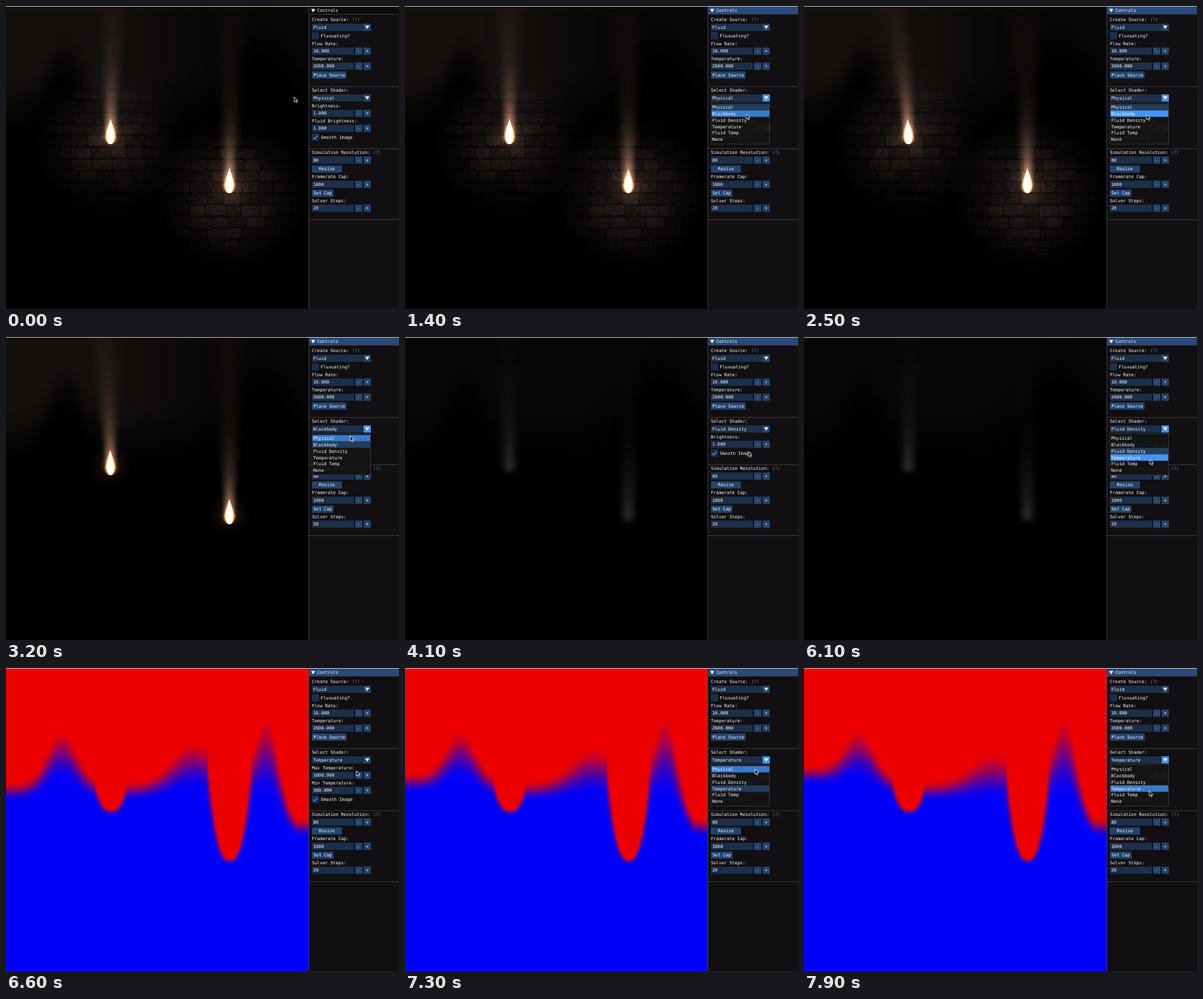
These frames come from a looping animation (600 by 463 pixels, 8 s). An HTML page with a canvas:

```html
<!DOCTYPE html>
<html lang="en">
<head>
<meta charset="utf-8">
<title>Fluid controls</title>
<style>
html, body { margin: 0; width: 600px; height: 463px; overflow: hidden; background: #000; }
canvas, svg { position: absolute; left: 0; top: 0; display: block; }
text { font: 6.73px "DejaVu Sans Mono", "Liberation Mono", monospace; white-space: pre; }
</style>
</head>
<body>
<canvas id="view" width="600" height="463"></canvas>
<svg id="ui" width="600" height="463" viewBox="0 0 600 463"></svg>
<script>
const LOOP = 8000, STEP = 100, W = 462, H = 463;
const ctx = document.getElementById('view').getContext('2d');
const ui = document.getElementById('ui');

// Each menu opens, then its click switches the mode; the last stays open.
const items = ['Physical', 'Blackbody', 'Fluid Density', 'Temperature', 'Fluid Temp', 'None'];
const menus = [
  { open: 800, pick: 2600 }, { open: 3000, pick: 3700 },
  { open: 5100, pick: 6200 }, { open: 7200, pick: LOOP }
];
// [time, x, y]
const mouse = [
  [0, 440, 139], [700, 529, 142], [1400, 521, 165], [2600, 523, 166], [3000, 526, 143],
  [3600, 524, 175], [4500, 524, 175], [5000, 530, 143], [5900, 528, 187], [6200, 528, 187],
  [6600, 535, 157], [7100, 537, 143], [7700, 527, 188]
];

const lerp = (a, b, k) => a + (b - a) * k;
const bell = d => Math.exp(-d * d);
const smooth = k => { k = Math.min(1, Math.max(0, k)); return k * k * (3 - 2 * k); };

function mouseAt(t) {
  let i = 0;
  while (i < mouse.length - 2 && mouse[i + 1][0] <= t) i++;
  const [t0, x0, y0] = mouse[i], [t1, x1, y1] = mouse[i + 1];
  const k = smooth((t - t0) / (t1 - t0));
  return [lerp(x0, x1, k), lerp(y0, y1, k)];
}

// Vertical blend centred on y, spread over w on both sides.
function column(x, y, w, top, low) {
  const g = ctx.createLinearGradient(0, y - w, 0, y + w);
  for (let i = 0; i <= 6; i++) {
    const k = i / 6;
    g.addColorStop(k, `rgb(${top.map((v, j) => lerp(v, low[j], smooth(k))).join()})`);
  }
  ctx.fillStyle = g;
  ctx.fillRect(x, 1, 1, H);
}

function drawHeat(t) {
  const k = (t - 6600) / 1300;
  for (let x = 0; x < W; x++) {
    const a = bell((x - 85) / 32), b = bell((x - 288) / 48), c = bell((x - 398) / 24);
    let y = 189 - 26 * k * (1 - smooth(x / 190)) + 55 * smooth((x - 395) / 50)
      - (58 - 14 * k) * a - (43 - 18 * k) * b - 60 * c;
    let w = 15 + 24 * a + 22 * b + 48 * c;
    for (const [cx, low, rise] of [[160, 220, 17], [341, 295, 30]]) {
      const up = rise * Math.pow(Math.abs(x - cx) / 19, 2.5);
      const mix = 1 / (1 + Math.exp((y - low + up) / 6));
      y = lerp(y, low - up, mix);
      w = lerp(w, 5 + 0.4 * up, mix);
    }
    column(x, y, w, [236, 0, 0], [0, 0, 250]);
  }
}

function drawHaze(rgb, fade) {
  for (let x = 0; x < W; x++) {
    const y = 150 - 75 * bell((x - 90) / 36) - 100 * bell((x - 390) / 65);
    const k = 1 - fade * smooth((x - 80) / 300);
    column(x, y, 55, rgb.map(v => v * k), [0, 0, 0]);
  }
}

function makeCanvas() {
  const c = document.createElement('canvas');
  c.width = W; c.height = H;
  return c;
}

function makeWall() {
  let seed = 7;
  const rnd = () => (seed = seed * 16807 % 2147483647) / 2147483647;
  const wall = makeCanvas(), c = wall.getContext('2d');
  c.fillStyle = '#1a1413';
  c.fillRect(0, 0, W, H);
  for (let r = 0; r < 18; r++) {
    const y = 92 + r * 17.7;
    for (let x = 40 + (r % 2) * 14 + rnd() * 6; x < 460;) {
      const w = 22 + rnd() * 11, v = 0.7 + rnd() * 0.5, dy = rnd() * 2;
      c.fillStyle = `rgb(${56 * v},${43 * v},${39 * v})`;
      c.beginPath();
      c.roundRect(x, y + dy, w - 1.5, 15.5 - rnd(), 3);
      c.fill();
      for (let i = 0; i < 14; i++) {
        c.fillStyle = rnd() < 0.6 ? 'rgba(0,0,0,.25)' : 'rgba(135,105,92,.13)';
        c.fillRect(x + rnd() * (w - 6), y + dy + rnd() * 14, 1 + rnd() * 5, 1 + rnd() * 2);
      }
      x += w;
    }
  }
  const mask = makeCanvas(), m = mask.getContext('2d');
  for (const [x, y, a] of [[158, 204, 0.72], [343, 286, 0.9]]) {
    const g = m.createRadialGradient(x, y, 0, x, y, 118);
    for (let k = 0; k <= 1; k += 0.125)
      g.addColorStop(k, `rgba(0,0,0,${a * Math.pow(1 - k, 1.25)})`);
    m.fillStyle = g;
    m.fillRect(0, 0, W, H);
  }
  c.globalCompositeOperation = 'destination-in';
  c.drawImage(mask, 0, 0);
  return wall;
}
const wall = makeWall();

// One row of light, strongest in the middle.
function band(x, y, r, rgb, a) {
  const g = ctx.createLinearGradient(x - r, 0, x + r, 0);
  for (let i = -4; i <= 4; i++)
    g.addColorStop(0.5 + i / 8, `rgba(${rgb},${a * (1 - smooth(Math.abs(i) / 4))})`);
  ctx.fillStyle = g;
  ctx.fillRect(x - r, y, 2 * r, 1);
}

function glow(cx, cy) {
  const g = ctx.createRadialGradient(cx, cy, 2, cx, cy, 34);
  g.addColorStop(0, 'rgba(255,160,90,.3)');
  g.addColorStop(0.45, 'rgba(220,130,75,.07)');
  g.addColorStop(1, 'rgba(200,110,60,0)');
  ctx.fillStyle = g;
  ctx.fillRect(cx - 34, cy - 34, 68, 68);
}

function plume(cx, base, lean, grey, t) {
  const taper = 25 + 1.5 * Math.sin(t / 130 + cx);
  ctx.globalCompositeOperation = 'lighter';
  if (!grey) glow(cx, base - 14);
  for (let y = base; y > 0; y--) {
    const d = base - y, s = d / base, x = cx + lean * Math.pow(s, 1.7);
    if (grey) {
      band(x, y, 16 + d * 0.05, '250,250,255',
        Math.min(1, d / 14) * (0.18 * Math.exp(-d / 55) + 0.018 * (1 - s)));
      continue;
    }
    band(x, y, 10 + d * 0.1, '230,165,130',
      Math.min(1, d / 22) * (0.66 * Math.exp(-Math.max(0, d - 20) / 26) + 0.36 * Math.exp(-d / 95)));
    const r = 9.5 * (d < 13 ? Math.sqrt(1 - ((13 - d) / 13) ** 2) : Math.max(0, 1 - (d - 13) / taper));
    if (r > 0.3) {
      band(x, y, r * 1.2, '255,180,90', 1);
      band(x, y, r, '255,235,185', 1);
    }
  }
  ctx.globalCompositeOperation = 'source-over';
}

function drawView(t, mode) {
  ctx.fillStyle = '#000';
  ctx.fillRect(0, 0, 600, H);
  if (mode === 3) return drawHeat(t);
  const grey = mode === 2;
  drawHaze(grey ? [7, 7, 9] : [20, 16, 14], grey ? 0.2 : 0.6);
  if (mode === 0) {
    ctx.globalCompositeOperation = 'lighter';
    ctx.drawImage(wall, 0, 0);
    ctx.globalCompositeOperation = 'source-over';
  }
  plume(159.5, 211, 4 * Math.cos(t / 1000) - 22 * bell((t - 2500) / 600), grey, t);
  plume(341, 286, 6 * Math.cos(2 * Math.PI * t / 4100), grey, t);
}

const FRAME = '#1d2f49', BUTTON = '#23456d', BRIGHT = '#4296fa', LINE = '#3d3d45';
const rect = (x, y, w, h, fill, more = '') =>
  `<rect x="${x}" y="${y}" width="${w}" height="${h}" fill="${fill}" ${more}/>`;
const text = (x, y, s, fill = '#fff') => `<text x="${x}" y="${y + 2.4}" fill="${fill}">${s}</text>`;
const down = (x, y) => `<path d="M${x - 3.2} ${y - 2.6}h6.4l-3.2 5.4z" fill="#fff"/>`;
const rule = y => rect(463, y, 137, 1, LINE);
const help = (x, y) => text(x, y, '(?)', '#808080');
const button = (y, w, s) =>
  rect(467, y - 5.5, w, 11, BUTTON) + text(467 + (w - s.length * 4.05) / 2, y, s);
const combo = (y, s, hot, open) =>
  rect(467, y - 5.5, 79, 11, hot && !open ? BUTTON : FRAME) +
  rect(546, y - 5.5, 11, 11, hot || open ? BRIGHT : BUTTON) + down(551.5, y) + text(469, y, s);
const check = (y, s, on) => rect(467, y - 5.5, 11, 11, FRAME) +
  (on ? `<path d="M469.2 ${y + 0.2}l2.2 2.4 4.4-5" fill="none" stroke="${BRIGHT}" stroke-width="1.4"/>` : '') +
  text(480.5, y, s);
const field = (y, label, value) => text(467, y, label) + rect(467, y + 6, 64, 11, FRAME) +
  text(469, y + 11.5, value) + rect(533, y + 6, 11, 11, BUTTON) + text(536.5, y + 11.3, '-') +
  rect(546, y + 6, 11, 11, BUTTON) + text(549.5, y + 11.3, '+');

function menu(mode, hover, pressed) {
  let s = rect(467, 147.5, 89.5, 63.5, '#141414', `fill-opacity=".94" stroke="${LINE}" stroke-width=".8"`);
  items.forEach((name, i) => {
    const y = 154.6 + i * 9.85;
    const fill = i === hover ? (pressed ? BRIGHT : '#397ccc') : i === mode ? '#223e5b' : '';
    if (fill) s += rect(468, y - 4.9, 88, 9.85, fill);
    s += text(469, y, name);
  });
  return s;
}

function panel(mode, active, open, hover, hot, pressed) {
  const two = mode === 0 || mode === 3, o = two ? 0 : -23;
  let s = rect(462, 0, 138, 463, '#110f11') + rect(462, 1, 1, 462, LINE) +
    rect(463, 1, 137, 11.5, active ? '#294a7a' : '#0a0a0a') + rule(12) +
    down(469, 7) + text(475, 7, 'Controls') +
    text(467, 21, 'Create Source:') + help(528.5, 21) + combo(32.5, 'Fluid') +
    check(45.5, 'Fluxuating?') + field(57.5, 'Flow Rate:', '10.000') +
    field(80.5, 'Temperature:', '2600.000') + button(105.5, 53, 'Place Source') + rule(122.6) +
    text(467, 129, 'Select Shader:') + combo(140.5, items[mode], hot, open);
  s += mode === 3
    ? field(152.5, 'Max Temperature:', '1000.000') + field(175.5, 'Min Temperature:', '300.000')
    : field(152.5, 'Brightness:', '1.000') + (two ? field(175.5, 'Fluid Brightness:', '1.000') : '');
  s += check(200.5 + o, 'Smooth Image', true) + rule(217.6 + o) +
    field(224 + o, 'Simulation Resolution:', '80') + help(560.5, 224 + o) +
    button(249 + o, 46, 'Resize') + field(261 + o, 'Framerate Cap:', '1000') +
    button(286 + o, 33, 'Set Cap') + field(297.5 + o, 'Solver Steps:', '20') + rule(326 + o);
  if (open) s += menu(mode, hover, pressed);
  return s + rect(0, 0, 600, 1, '#c8c8c8');
}

const arrow = (x, y) => `<path transform="translate(${x} ${y})" d="M0 0v7.6l1.8-1.6 1.3 2.8 1.4-.6-1.3-2.7h2.4z"
  fill="#000" stroke="#fff" stroke-width=".8"/>`;

function draw(t) {
  const mode = menus.filter(m => m.pick <= t).length;
  const [x, y] = mouseAt(t);
  const shown = menus.find(m => t >= m.open && t < m.pick);
  const hover = Math.floor((y - 149.6) / 9.85);
  const hot = !shown && x > 467 && x < 557 && y > 135 && y < 146.5;
  const pressed = shown && shown.pick < LOOP && shown.pick - t <= STEP;
  drawView(t, mode);
  ui.innerHTML = panel(mode, t >= 700, !!shown, hover, hot, pressed) + arrow(x, y);
}

let last = -1;
function tick(now) {
  const t = Math.floor(now % LOOP / STEP) * STEP;
  if (t !== last) draw(last = t);
  requestAnimationFrame(tick);
}
draw(0);
requestAnimationFrame(tick);
</script>
</body>
</html>
```
